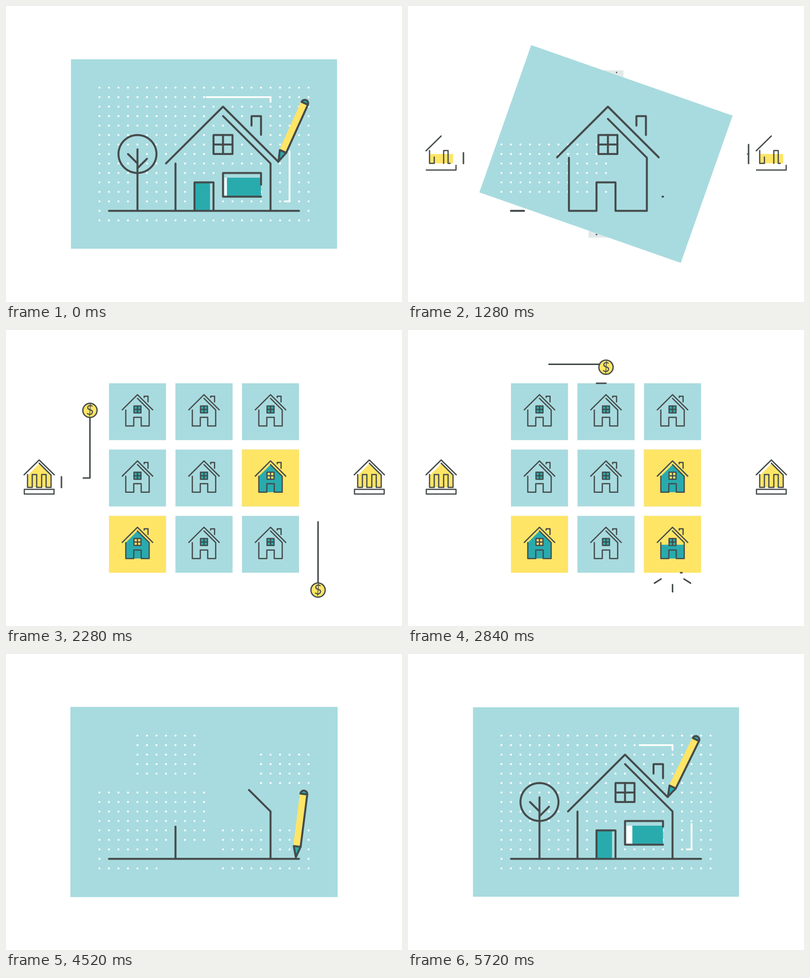
An HTML page with a canvas for the animation above (5.76 s loop, 800 by 600 pixels).

```html
<!DOCTYPE html>
<html lang="en">
<head>
<meta charset="utf-8">
<title>House plans</title>
<style>
html, body { margin: 0; width: 100%; height: 100%; overflow: hidden; background: #fff; }
canvas { display: block; width: 800px; height: 600px; }
</style>
</head>
<body>
<canvas id="stage" width="800" height="600"></canvas>
<script>
const ctx = document.getElementById('stage').getContext('2d');
const LOOP = 5760, STEP = 40;
const U = 19.2; // grid unit in pixels; the grid starts at the middle of the stage
const INK = '#454b4b', BLUE = '#a8dbdf', TEAL = '#29abae', YELLOW = '#ffe566', GREY = '#e2eae9', WHITE = '#fff';

const lerp = (a, b, k) => a + (b - a) * k;
const clamp = k => Math.max(0, Math.min(1, k));
const linear = k => k;
const quadIn = k => k * k;
const quadOut = k => k * (2 - k);
const cubicOut = k => 1 - (1 - k) ** 3;
const inOut = k => k < .5 ? 2 * k * k : 1 - 2 * (1 - k) ** 2;
const soft = k => (k + inOut(k)) / 2;
const prog = (t, a, b, ease = inOut) => ease(clamp((t - a) / (b - a)));

// draws in units of a given size; line widths stay in pixels
let unit = 1;
function at(x, y, size, draw) {
  const outer = unit;
  ctx.save();
  ctx.translate(x, y);
  ctx.scale(size, size);
  unit *= size;
  draw();
  unit = outer;
  ctx.restore();
}
const onGrid = draw => at(400, 300, U, draw);

const dist = (a, b) => Math.hypot(b[0] - a[0], b[1] - a[1]);
const pathLength = pts => pts.slice(1).reduce((sum, p, i) => sum + dist(pts[i], p), 0);

function pointAt(pts, s) {
  for (let i = 1; i < pts.length; i++) {
    const [a, b] = [pts[i - 1], pts[i]], d = dist(a, b);
    if (s <= d || i === pts.length - 1) {
      const k = clamp(s / d || 0);
      return [lerp(a[0], b[0], k), lerp(a[1], b[1], k)];
    }
    s -= d;
  }
}

// strokes the part of a polyline between two fractions of its length
function stroke(pts, from = 0, to = 1, width = 4, color = INK) {
  if (to <= from) return;
  const total = pathLength(pts), a = from * total, b = to * total;
  ctx.beginPath();
  ctx.moveTo(...pointAt(pts, a));
  let s = 0;
  for (let i = 1; i < pts.length; i++) {
    s += dist(pts[i - 1], pts[i]);
    if (s > a && s < b) ctx.lineTo(...pts[i]);
  }
  ctx.lineTo(...pointAt(pts, b));
  ctx.lineWidth = width / unit;
  ctx.strokeStyle = color;
  ctx.stroke();
}

function fill(pts, color) {
  ctx.beginPath();
  pts.forEach(p => ctx.lineTo(...p));
  ctx.fillStyle = color;
  ctx.fill();
}

function box(x0, y0, x1, y1, color) {
  if (x1 <= x0 || y1 <= y0) return;
  ctx.fillStyle = color;
  ctx.fillRect(x0, y0, x1 - x0, y1 - y0);
}
const square = (x, y, half, color) => box(x - half, y - half, x + half, y + half, color);

// fills a shape from its floor upwards
function risingFill(pts, level, color) {
  ctx.save();
  ctx.beginPath();
  ctx.rect(-50, level, 100, 100);
  ctx.clip();
  fill(pts, color);
  ctx.restore();
}

// house around its own middle line; narrow: plan to compact house, icon: compact house to icon
const middleOf = narrow => lerp(2, .2, narrow);
function houseParts(narrow, icon) {
  const wall = lerp(5, 4.1, narrow), eave = lerp(6, 5.35, narrow), inner = lerp(-4, -3.7, narrow);
  const doorX = -middleOf(narrow) * (1 - icon), door = lerp(1, 1.3, icon);
  const chimX = lerp(3, 2.35, icon), chimW = lerp(1, 1.35, icon), chimY = lerp(-4, -4.45, icon);
  return {
    inner, wall,
    roof: [[-eave, eave - 5], [0, -5], [eave, eave - 5]],
    left: [[-wall, inner + wall], [-wall, 6], [doorX - door, 6], [doorX - door, 3], [doorX, 3]],
    right: [[doorX, 3], [doorX + door, 3], [doorX + door, 6], [wall, 6], [wall, inner + wall], [0, inner]],
    chimney: [[chimX, chimY + lerp(1, .45, icon)], [chimX, chimY], [chimX + chimW, chimY], [chimX + chimW, chimY + 2]],
    paneY: lerp(-1, .2, icon), pane: lerp(1, 1.22, icon)
  };
}

function smallWindow({ paneY: y, pane: r }, frame, up, across, width) {
  stroke([[-r, y - r], [-r, y + r], [r, y + r], [r, y - r], [-r, y - r]], 0, frame, width);
  stroke([[0, y + r], [0, y - r]], 0, up, width);
  stroke([[r, y], [-r, y]], 0, across, width);
}

function house(narrow, icon, width, { draw = 1, pane = 0, body = 0 }) {
  const h = houseParts(narrow, icon), { wall, inner, paneY: y, pane: r } = h;
  const level = lerp(6, inner, body), half = draw / 2;
  if (body > 0)
    risingFill([[-wall, 6], [-wall, inner + wall], [0, inner], [wall, inner + wall], [wall, 6]], level, TEAL);
  box(-r, y + r - 2 * r * pane, r, y + r, TEAL);
  if (body > 0) box(-r, Math.max(y - r, level), r, y + r, YELLOW);
  stroke(h.roof, 0, draw, width);
  for (const line of [h.left, h.right, h.chimney]) stroke(line, .5 - half, .5 + half, width);
  smallWindow(h, draw, draw, draw, width);
}

// blueprint
function dots(b) {
  ctx.fillStyle = WHITE;
  for (let i = 0; i < 23; i++) for (let j = 0; j < 15; j++) {
    const core = i < 12 && j > 5 && j < 12;
    const early = core || (j < 5 && i > 3 && i < 11) || (j > 1 && j < 6 && i > 16)
      || (j > 9 && i > 12) || (j > 11 && i < 7);
    const shown = early ? 4270 + 12 * j : 4560 + 50 * Math.floor(i / 5);
    const hidden = core ? 7080 : 6640 + 60 * Math.floor(i / 5);
    if (b < shown || b >= hidden) continue;
    ctx.beginPath();
    ctx.arc(i - 11, j - 7, 2 / U, 0, 7);
    ctx.fill();
  }
}

function dimensions(b) {
  const gone = prog(b, 6400, 6720), p = prog(b, 5606, 5919);
  stroke([[7, -5.5], [7, -6], [-7, -6], [-7, -5.5]], gone, p, 3.6, WHITE);
  stroke([[8.5, 5], [9, 5], [9, -6], [8.5, -6]], gone, p, 3.6, WHITE);
}

function door(b) {
  const p = prog(b, 5000, 5300) * (1 - prog(b, 6420, 6720));
  box(-1, 6 - 3 * p, .63, 6, TEAL);
  if (b < 6400) stroke([[-1, 6], [-1, 3], [1, 3], [1, 6]], 0, prog(b, 4680, 5000));
}

function bigWindow(b) {
  const right = lerp(6, 2.15, prog(b, 6400, 6700));
  box(lerp(6, 2.15, prog(b, 5480, 5640)), 2.5, right, 4.5, WHITE);
  box(lerp(6, 2.15, prog(b, 5552, 5833, quadOut)), 2.5, right, 4.5, TEAL);
  stroke([[6, 4.5], [2, 4.5], [2, 2], [6, 2], [6, 4.5]], 0,
    prog(b, 5372, 5935, quadOut) * (1 - prog(b, 6420, 7070)));
}

function tree(b) {
  const out = 1 - prog(b, 6400, 6860), twig = prog(b, 5100, 5350) * out;
  const ring = Array.from({ length: 61 }, (_, i) => {
    const a = Math.PI * (.5 + i / 30);
    return [2 * Math.cos(a) - 7, 2 * Math.sin(a)];
  });
  stroke([[-7, 6], [-7, -.5]], 0, prog(b, 4860, 5200) * out);
  stroke([[-7, 1], [-8, 0]], 0, twig);
  stroke([[-7, 1.5], [-6, .5]], 0, twig);
  stroke(ring, 0, prog(b, 5050, 5600) * out);
}

function planHouse(b) {
  const h = houseParts(0, 0), walls = prog(b, 4310, 4660);
  stroke([[-5, 6], [-5, 1]], 0, walls);
  stroke([[5, 6], [5, 1], [0, -4]], 0, walls);
  stroke(h.roof, 0, prog(b, 4860, 5410) / 2 + prog(b, 5432, 5765, quadIn) / 2);
  stroke(h.chimney, 0, prog(b, 5630, 5770, quadOut));
  smallWindow(h, prog(b, 5200, 5560), prog(b, 5440, 5640), prog(b, 5605, 5765, quadOut));
}

function plan(b) {
  dots(b);
  dimensions(b);
  door(b);
  bigWindow(b);
  tree(b);
  stroke([[-10, 6], [10, 6]], 0, prog(b, 3940, 4440) * (1 - prog(b, 6600, 7140)));
  if (b < 6400) at(2, 0, 1, () => planHouse(b));
}

// the pen rests between legs: from, to, grid x, grid y, tilt, ease
const LEGS = [
  [3640, 3900, -10, 6, 41.5], [3940, 4440, 10, 6, 6.5], [4480, 4840, -4, 1, 35],
  [4860, 5410, 2, -5, 32], [5432, 5765, 8, 1, 24, quadIn], [5765, 6080, 25, 2, 6, linear]
];
function pencil(b) {
  if (b < 3640 || b > 6080) return;
  const [x, y, tilt] = LEGS.reduce((pose, [from, to, ...leg]) =>
    pose.map((v, i) => lerp(v, leg[i], prog(b, from, to, leg[3]))), [-27, 9, 60]);
  ctx.save();
  ctx.translate(400 + x * U, 300 + y * U);
  ctx.rotate(tilt * Math.PI / 180);
  box(-8, -130, 7, -22, YELLOW);
  const tip = [[0, -1], [-7, -23], [7, -23], [0, -1]];
  fill(tip, TEAL);
  stroke(tip);
  stroke([[7, -23], [7, -130]]);
  ctx.beginPath();
  ctx.arc(0, -130, 7, Math.PI, 0);
  ctx.closePath();
  ctx.fillStyle = TEAL;
  ctx.fill();
  ctx.stroke();
  ctx.restore();
}

// coins leave a bank on one side and reach a tile from direction dx, dy
const ROUTES = [
  { side: 1, col: 1, row: 0, dx: 1, dy: 0, start: 1260, end: 1660 },
  { side: -1, col: -1, row: 1, dx: -1, dy: 0, start: 1312, end: 1852 },
  { side: 1, col: 1, row: 1, dx: 0, dy: 1, start: 1580, end: 2640 },
  { side: -1, col: 0, row: -1, dx: 0, dy: -1, start: 1880, end: 2870 }
];
for (const r of ROUTES) {
  const x = 7 * r.col, y = 7 * r.row, edge = 12 * r.side;
  const turns = r.dx ? [[edge, y]] : [[edge, 12 * r.dy], [x, 12 * r.dy]];
  r.path = [[15 * r.side, 0], [edge, 0], ...turns, [x + 4.25 * r.dx, y + 4.25 * r.dy]];
  r.hit = r.end - 80;
}

function coin(x, y, size) {
  if (size <= 0) return;
  at(x, y, size / U, () => {
    ctx.beginPath();
    ctx.arc(0, 0, 14.4, 0, 7);
    ctx.fillStyle = YELLOW;
    ctx.fill();
    ctx.lineWidth = 2.6;
    ctx.strokeStyle = INK;
    ctx.stroke();
    ctx.fillStyle = INK;
    ctx.font = '26px Lato, sans-serif';
    ctx.fillText('$', 0, 9.2);
  });
}

function delivery(t, { side, path, start, end }) {
  const bar = prog(t, start - 80, start + 10) * (1 - prog(t, start + 330, start + 480));
  const head = time => prog(time, start, end, soft);
  stroke([[15 * side, 1], [15 * side, -1]], 0, bar, 3);
  stroke(path, head(t - 270), head(t), 3);
  coin(...pointAt(path, head(t) * pathLength(path)), prog(t, start, start + 120) * (1 - prog(t, end, end + 80)));
}

function impact({ dx, dy }, age) {
  if (age < 0 || age > 420) return;
  ctx.save();
  ctx.rotate(Math.atan2(dy, dx));
  if (dy > 0) ctx.scale(1, -1);
  stroke([[3, -1], [3, 1]], prog(age, 180, 305), prog(age, 0, 100), 3);
  for (const side of [-1, 1])
    stroke([[3.62, 1.15 * side], [4.1, 1.9 * side]], prog(age, 250, 400), prog(age, 70, 160), 3);
  ctx.restore();
}

function tile(t, col, row) {
  const corner = col && row;
  const age = t - 1150 - (corner ? (col === row ? 110 : 267) : 0);
  if (age <= 0) return;
  const route = ROUTES.find(r => r.col === col && r.row === row);
  at(400 + 7 * U * col, 300 + 7 * U * row, U, () => {
    square(0, 0, 3 * prog(age, 0, 480, cubicOut), GREY);
    square(0, 0, 3 * prog(age, 200, 680, cubicOut), BLUE);
    let body = 0;
    if (route) {
      const { dx, dy, hit } = route, rest = 3 - 6 * prog(t, hit + 90, hit + 200, linear);
      box(dx > 0 ? rest : -3, dy > 0 ? rest : -3, dx < 0 ? -rest : 3, dy < 0 ? -rest : 3, YELLOW);
      body = prog(t, hit + 190, hit + 370, linear);
      impact(route, t - hit);
    }
    at(0, -.3, .3, () => house(1, 1, 2.5, { draw: prog(age, 100, 450), pane: prog(age, 280, 430), body }));
  });
}

function bank(t, x) {
  const p = prog(t, 1130, 1430), rise = prog(t, 1130, 1470), w = 2.5;
  at(x, 293, 1, () => {
    risingFill([[-23.5, 2], [0, -22], [24, 1], [24, 26], [-23.5, 26]], 26 - 49 * rise, YELLOW);
    stroke([[-30.5, .5], [0, -29.5], [30.5, .5]], 0, p, w);
    stroke([[-23.5, 0], [-23.5, 26], [-14, 26], [-14, 0], [-5, 0], [-5, 26]], 0, p, w);
    stroke([[5, 26], [5, 0], [14, 0], [14, 26], [24, 26], [24, 1], [0, -23]], 0, p, w);
    stroke([[5, 26], [-5, 26]], 0, 2 * p - 1, w);
    stroke([[-30, 39.5], [30, 39.5], [30, 30], [-30, 30], [-30, 39.5]], 0, p, w);
  });
}

function market(t) {
  bank(t, 67);
  bank(t, 734);
  for (let row = -1; row < 2; row++) for (let col = -1; col < 2; col++)
    if (row || col) tile(t, col, row);
  onGrid(() => [...ROUTES].reverse().forEach(r => delivery(t, r)));
}

// the sheet turns into the middle tile, then fills the stage and settles again
function sheet(t) {
  const s = prog(t, 1060, 1680), zoom = prog(t, 3000, 3480);
  let w = lerp(lerp(28, 6, s), 52, zoom), h = lerp(lerp(20, 6, s), 38, zoom);
  if (t >= 3600) {
    const grow = 1 + Math.max(0, (4880 - t) / 1086) ** 5;
    w = 28 * grow;
    h = 20 * grow;
  }
  onGrid(() => {
    if (t < 1700) ctx.rotate(Math.PI / 2 * s ** 1.115);
    box(-w / 2, -h / 2, w / 2, h / 2, BLUE);
  });
}

function middleHouse(t) {
  if (t < 640 || t > 3880) return;
  const narrow = prog(t, 680, 1240), icon = prog(t, 1290, 1700), zoom = prog(t, 3000, 3480);
  const size = lerp(lerp(1, .3, icon), 1.345, zoom), width = lerp(4, 2.5, icon);
  const x = middleOf(narrow) * (1 - icon), y = lerp(-.3 * icon, 1.5, zoom);
  onGrid(() => at(x, y, size, () => house(narrow, icon, width, {
    draw: 1 - prog(t, 3620, 3880),
    pane: prog(t, 1480, 1640) * (1 - prog(t, 3200, 3480))
  })));
}

function leftovers(t) {
  if (t < 3800 || t > 4040) return;
  const gone = prog(t, 3860, 4040, linear);
  stroke([[294.5, 351], [294.5, 483]], gone, 1, 2.8);
  stroke([[285, 402], [285, 442]], gone, 1, 2.8);
}

function render(t) {
  // drawing starts late in one loop and is cleared early in the next
  const b = t < 3600 ? t + LOOP : t;
  box(0, 0, 800, 600, WHITE);
  if (t > 1100 && t < 3600) market(t);
  sheet(t);
  if (b < 7140) onGrid(() => plan(b));
  middleHouse(t);
  leftovers(t);
  pencil(b);
}

ctx.lineCap = ctx.lineJoin = 'round';
ctx.textAlign = 'center';
const begin = performance.now();
function tick() {
  const t = (performance.now() - begin) % LOOP;
  render(Math.floor(t / STEP) * STEP);
  requestAnimationFrame(tick);
}
tick();
</script>
</body>
</html>
```
